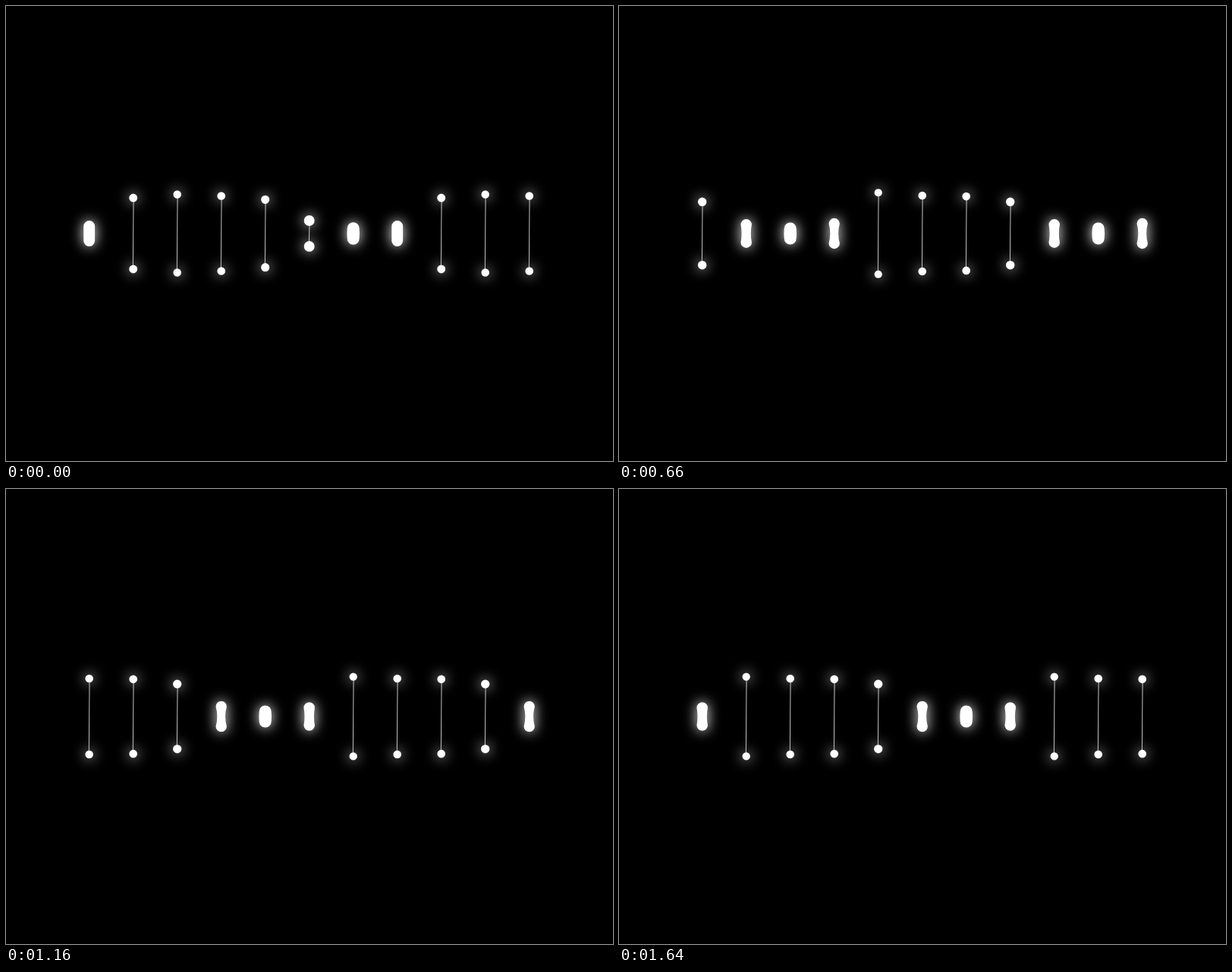
An HTML page with a canvas that plays this animation: 800x600 px, repeating every 1660 ms.

```html
<!DOCTYPE html>
<html lang="en">
<head>
<meta charset="utf-8">
<title>Dumbbell wave</title>
<style>
  html, body { margin: 0; width: 100%; height: 100%; overflow: hidden; background: #000; }
  canvas { display: block; }
</style>
</head>
<body>
<canvas width="800" height="600"></canvas>
<script>
const ctx = document.querySelector('canvas').getContext('2d');
const LOOP = 1660, STEP = 20;      // the loop restarts one step before a full cycle
const CYCLE = 1680, COLUMNS = 11, DELAY = CYCLE / 7;
const LEFT = 109.7, GAP = 58, MIDDLE = 300;
const OPEN_AT = 200, OPEN_TIME = 900;
const CLOSE_AT = 1170, CLOSE_TIME = 700;
const CLOSED_REACH = 6.6, OPEN_REACH = 50;

// Same meaning as the CSS cubic-bezier() timing function
function cubicBezier(x1, y1, x2, y2) {
  const curve = (a, b, s) => 3 * (1 - s) ** 2 * s * a + 3 * (1 - s) * s * s * b + s ** 3;
  return progress => {
    const x = Math.min(1, Math.max(0, progress));
    let low = 0, high = 1;
    for (let i = 0; i < 24; i++) {
      const s = (low + high) / 2;
      if (curve(x1, x2, s) < x) low = s; else high = s;
    }
    return curve(y1, y2, low);
  };
}
const openEase = cubicBezier(0.6, 0.05, 0.1, 1);
const closeEase = cubicBezier(0.65, -0.55, 0.2, 1.05);   // opens a little further before closing

function openness(time) {
  const sinceOpening = (time - OPEN_AT + CYCLE) % CYCLE;
  return openEase(sinceOpening / OPEN_TIME)
    - closeEase((sinceOpening + OPEN_AT - CLOSE_AT) / CLOSE_TIME);
}

function drawColumn(x, time) {
  const open = openness(time);
  const reach = CLOSED_REACH + (OPEN_REACH - CLOSED_REACH) * open;
  const overlap = Math.max(0, 10 - reach);
  const radius = 7.5 - 2.2 * open + 0.15 * overlap;
  const top = MIDDLE - reach, bottom = MIDDLE + reach;

  ctx.shadowBlur = 0;
  ctx.strokeStyle = '#c4c4c4';
  ctx.beginPath();
  ctx.moveTo(x + 0.4, top);
  ctx.lineTo(x - 0.4, bottom);
  ctx.stroke();

  ctx.fillStyle = ctx.shadowColor = '#fff';
  ctx.shadowBlur = 17;
  ctx.beginPath();
  if (reach < 15) {
    // Close balls melt together with a curved waist
    const waist = radius + Math.min(0.3, 0.5 * (9.5 - reach));
    const bend = 2 * waist - radius;
    ctx.arc(x, top, radius, Math.PI, 0);
    ctx.quadraticCurveTo(x + bend, MIDDLE, x + radius, bottom);
    ctx.arc(x, bottom, radius, 0, Math.PI);
    ctx.quadraticCurveTo(x - bend, MIDDLE, x - radius, top);
  } else {
    for (const y of [top, bottom]) {
      ctx.moveTo(x + radius, y);
      ctx.arc(x, y, radius, 0, 2 * Math.PI);
    }
  }
  ctx.fill();
}

function draw() {
  const time = Math.floor(performance.now() % LOOP / STEP) * STEP;
  ctx.shadowBlur = 0;
  ctx.fillStyle = '#000';
  ctx.fillRect(0, 0, 800, 600);
  for (let i = 0; i < COLUMNS; i++) {
    drawColumn(LEFT + GAP * i, (time - DELAY * i + 2 * CYCLE) % CYCLE);
  }
  requestAnimationFrame(draw);
}
draw();
</script>
</body>
</html>
```
